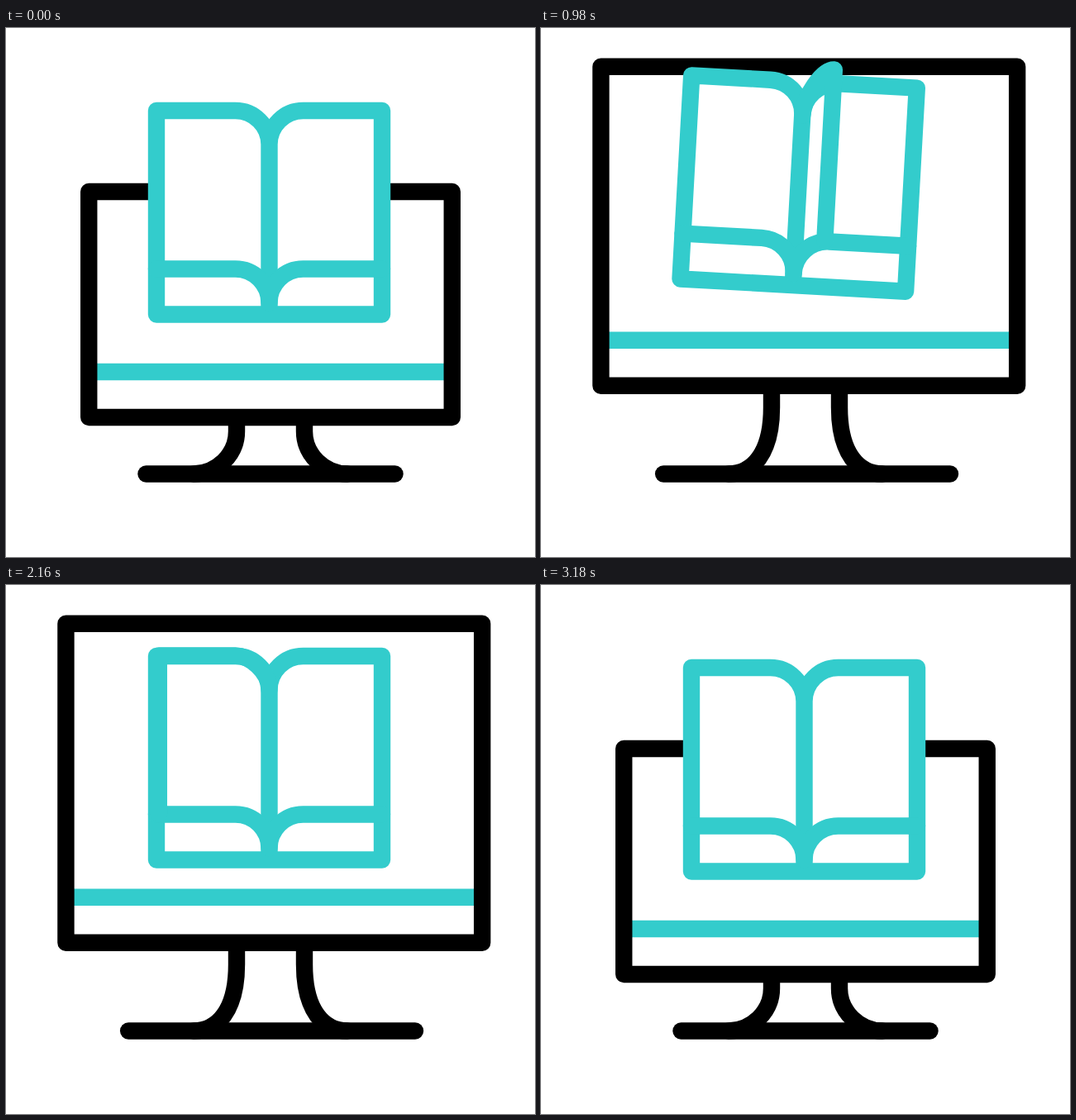
Write an HTML page that moves like this. It is 640 px wide and 640 px high and loops after 3440 ms.

```html
<!DOCTYPE html>
<html lang="en">
<head>
<meta charset="utf-8">
<title>Book and monitor</title>
<style>
  html, body { margin: 0; width: 100%; height: 100%; overflow: hidden; background: #fff; }
  svg { display: block; width: 100%; height: 100%; }
  path, rect { stroke-width: 20.4; stroke-linecap: round; stroke-linejoin: round; fill: none; }
  .dark path, .dark rect { stroke: #000; }
  .teal { stroke: #3cc; }
  .white { fill: #fff; }
  #bar { stroke-linecap: butt; }
</style>
</head>
<body>
<svg viewBox="0 0 640 640">
  <g class="dark">
    <path id="legs"/>
    <path id="base"/>
  </g>
  <g id="monitor">
    <rect id="screen" class="white"/>
    <path id="bar" class="teal"/>
    <g class="dark"><rect id="frame"/></g>
  </g>
  <g id="book" class="teal">
    <path class="white" d="M0 41A41 41 0 0 0 -41 0H-136.5V246.5H136.5V0H41A41 41 0 0 0 0 41V246.5"/>
    <path d="M-136.5 191.5H-41A41 41 0 0 1 0 232.5A41 41 0 0 1 41 191.5H136.5"/>
    <path id="page"/>
  </g>
</svg>
<script>
const LOOP = 3440, STEP = 20, FLOOR = 539.5;
const set = (id, attrs) => {
  const el = document.getElementById(id);
  for (const k in attrs) el.setAttribute(k, attrs[k]);
};

const lerp = (a, b, s) => a + (b - a) * s;

// Eased 0 to 1 between two times
function ramp(t, from, to) {
  const u = Math.min(1, Math.max(0, (t - from) / (to - from)));
  return u * u * (3 - 2 * u);
}

// Eased 0 to 1 and back to 0
const bump = (t, from, peak, to) => ramp(t, from, peak) - ramp(t, peak, to);

function mix(a, b, s) {
  const out = {};
  for (const k in a) out[k] = lerp(a[k], b[k], s);
  return out;
}

// x and bottom place the middle of the lower edge; half is half the foot
const REST = { x: 320, bottom: 471, size: 0, angle: 0, half: 150.5 };
const LEAN = { x: 315.7, bottom: 479.8, size: 0.54, angle: -5.4, half: 132.9 };
const TALL = { x: 324.3, bottom: 432.8, size: 1, angle: 0, half: 173.4 };

function drawMonitor(t) {
  let pose = mix(REST, LEAN, ramp(t, 0, 440));
  pose = mix(pose, TALL, ramp(t, 440, 700));
  pose = mix(pose, REST, ramp(t, 2316, 2939));

  const { x, bottom, size, angle, half } = pose;
  const w = lerp(439.5, 503.7, size), h = lerp(273, 386, size);
  const box = { x: -w / 2, y: -h, width: w, height: h };
  set('monitor', { transform: `translate(${x} ${bottom}) rotate(${angle})` });
  set('screen', box);
  set('frame', box);
  set('bar', { d: `M${-w / 2} -55H${w / 2}` });

  const bend = 488 + 0.76 * (bottom - 471);
  const leg = side => {
    const px = d => 320 + side * d;
    return `M${px(41)} ${bend - 60}V${bend}C${px(41)} 516 ${px(65)} ${FLOOR} ${px(93)} ${FLOOR}`;
  };
  const mid = lerp(320, x, 0.36);
  set('legs', { d: leg(-1) + leg(1) });
  set('base', { d: `M${mid - half} ${FLOOR}H${mid + half}` });
}

// A page turning from right to left, p from 0 to 1
function pagePath(p) {
  if (p <= 0 || p >= 1) return '';
  const edge = lerp(136.5, -136.5, p);
  const top = -18 * Math.sin(Math.PI * p);
  const curve = Math.sign(edge) * Math.min(Math.abs(edge), 41);
  return `M0 41C0 18 ${curve * 0.6} ${top} ${curve} ${top}L${edge} ${top}V191`;
}

function drawBook(t) {
  const tilt = 3.55 * bump(t, 0, 915, 1466) - 5.8 * bump(t, 915, 1466, 2090);
  const rise = 52 * bump(t, 40, 828, 1235)
    + 14 * bump(t, 1750, 2160, 2600)
    + 62 * bump(t, 2530, 2850, 3180);
  const y = 100 - rise + 0.2 * Math.abs(tilt);
  set('book', { transform: `translate(318.5 ${y}) rotate(${tilt})` });

  const turn = start => pagePath((t - start) / 581);
  set('page', { d: turn(765) + turn(1585) });
}

function draw() {
  const t = Math.floor((performance.now() % LOOP) / STEP) * STEP;
  drawMonitor(t);
  drawBook(t);
  requestAnimationFrame(draw);
}
draw();
</script>
</body>
</html>
```
